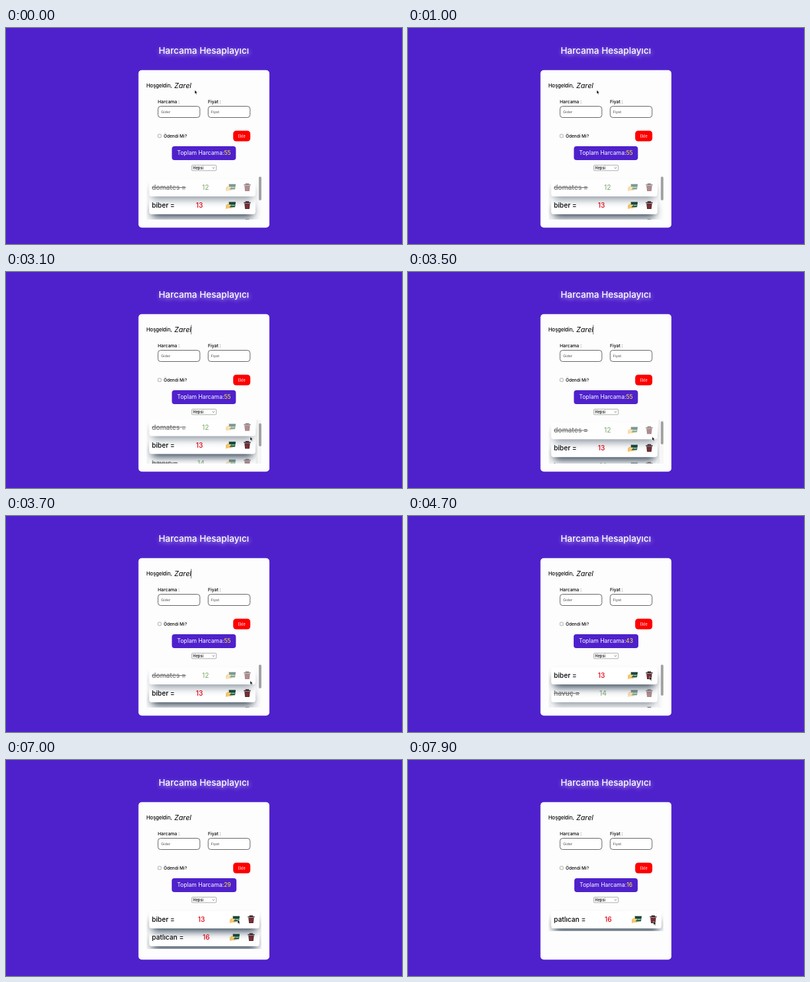
Write an HTML page that moves like this. It is 600 px wide and 327 px high and loops after 8000 ms.

```html
<!DOCTYPE html>
<html lang="tr">
<head>
<meta charset="utf-8">
<style>
  html, body { margin: 0; width: 100%; height: 100%; overflow: hidden; background: #4f21cc; }
  body { position: relative; font-family: Inter, "Open Sans", sans-serif; }
  svg { position: absolute; overflow: visible; }
  #stage { left: 0; top: 0; }
  #title { font-size: 13.6px; font-weight: 500; text-shadow: 1px 2px 6px #fff9; }
  #total {
    position: absolute; left: 300px; top: 179.4px; transform: translateX(-50%);
    padding: 0 8px; border-radius: 4px; background: #4f21cc; color: #fff;
    font-size: 8.6px; line-height: 20.2px; white-space: nowrap;
  }
  #sum { color: #ffee32; }
  #list { position: absolute; left: 213px; top: 224px; width: 174px; overflow: hidden; }
  #rows { position: absolute; inset: 0; }
  .row {
    position: absolute; left: 4px; height: 26px; border-radius: 4px; background: #fff;
    box-shadow: 0 8.3px 12.5px -4.2px rgb(38, 57, 77);
    font-size: 10.2px; font-weight: 500; line-height: 25px; white-space: nowrap;
  }
  .row span { position: absolute; top: 0; }
  .name { left: 4px; }
  .price { color: #e60012; }
  .paid { opacity: .55; }
  .paid .name { text-decoration: line-through; }
  .paid .price { color: #357a18; }
  .row svg { right: 6.7px; top: 6px; }
  #track, #thumb { position: absolute; }
  #track { right: 0; top: 0; width: 6px; height: 66px; background: #f6f6f6; border-left: .5px solid #e4e4e4; }
  #thumb { right: .5px; width: 3.6px; border-radius: 2px; background: #a3a3a3; }
</style>
</head>
<body>
<svg id="stage" width="600" height="327">
  <rect x="200.7" y="63.7" width="198.4" height="238.5" rx="5" fill="#fdfdfd"/>
  <text id="title" x="299.7" y="39.3" text-anchor="middle" fill="#fff">Harcama Hesaplayıcı</text>
  <g font-weight="500">
    <text x="212.7" y="90" font-size="7.6">Hoşgeldin,</text>
    <text x="230" y="113.7" font-size="6.8">Harcama :</text>
    <text x="306" y="113.7" font-size="6.8">Fiyat :</text>
    <text x="239" y="165.7" font-size="6.5">Ödendi Mi?</text>
  </g>
  <text x="255" y="90.7" font-size="10.7" font-style="italic">Zarel</text>
  <path id="caret" d="M280.6 80V94.5" stroke="#000" stroke-width=".5"/>
  <g fill="#fff" stroke="#555" stroke-width=".9">
    <rect x="230.3" y="118.5" width="63.5" height="17" rx="4"/>
    <rect x="306.3" y="118.5" width="63.5" height="17" rx="4"/>
  </g>
  <g fill="#666" font-size="5.4" font-weight="500">
    <text x="235" y="129">Gider</text>
    <text x="310.5" y="129">Fiyat</text>
  </g>
  <g fill="#fff" stroke="#767676" stroke-width=".6">
    <rect x="230.3" y="161" width="4.8" height="4.8" rx="1"/>
    <rect x="281.4" y="207.7" width="37.2" height="8.2" rx="1.2"/>
  </g>
  <text x="283.3" y="213.8" font-size="5.7" font-weight="500">Hepsi</text>
  <path d="M312.6 211l1.7 1.7 1.7-1.7" fill="none" stroke="#333" stroke-width=".6"/>
  <rect x="344.2" y="155.5" width="26" height="16" rx="4.5" fill="#f00"/>
  <text x="357.2" y="165.5" font-size="5.5" text-anchor="middle" fill="#fff">Ekle</text>
</svg>

<div id="total">Toplam Harcama:<span id="sum"></span></div>

<div id="list">
  <div id="rows"></div>
  <div id="track"></div>
  <div id="thumb"></div>
</div>

<svg width="0" height="0">
  <symbol id="icons" viewBox="0 0 38 13">
    <path d="M0 6.5L4 3.5 9 4 13 9 8 11H4L0 12Z" fill="#f5c56b"/>
    <path d="M4.5 1.2H15L14 9.2H6Z" fill="#235c4c"/>
    <path d="M5 3.2H14.8" stroke="#15352d" stroke-width="1.4"/>
    <path d="M8.5 6.4H13.5" stroke="#a9d6a5" stroke-width="1.3"/>
    <path d="M3 6.2L8 5.2 7.5 7.5 5 8.5Z" fill="#ffdc94"/>
    <path d="M27.3 2.6H37.7M30.5 2V.9H34.5V2" fill="none" stroke="#42272b" stroke-width="1.5"/>
    <path d="M28.3 3.8H36.7L35.8 12H29.2Z" fill="#4b2a2e"/>
    <path d="M30.4 4.8L30.8 11M32.5 4.8V11M34.6 4.8L34.2 11" stroke="#b52f38" stroke-width=".9"/>
  </symbol>
</svg>

<svg id="cursor" width="8" height="10" style="left:0;top:0">
  <path d="M0 0V5.6L1.3 4.5 2.2 6.5 3.2 6 2.3 4.1H4Z" fill="#000" stroke="#fff" stroke-width=".5"/>
</svg>

<script>
const LOOP = 8000, PITCH = 27, VIEW = 66;
const $ = id => document.getElementById(id);

const items = [
  { name: 'domates', price: 12, x: 80, paid: true, gone: 4700 },
  { name: 'biber', price: 13, x: 70.7, gone: 7650 },
  { name: 'havuç', price: 14, x: 73, paid: true, gone: 6000 },
  { name: 'patlıcan', price: 16, x: 78, gone: Infinity }
];

// Each stop is [time, ...values].
const cursorPath = [
  [0, 286, 94], [1400, 286, 94], [1900, 293, 114], [2050, 293, 114],
  [2400, 281, 88], [2600, 281, 88], [2950, 370, 249.5], [3800, 370, 249.5],
  [4300, 366, 243], [4900, 366, 243], [5300, 366, 248], [5550, 366, 248],
  [5850, 366, 269], [6250, 366, 269], [6850, 351, 242], [7150, 351, 242],
  [7500, 372, 244], [LOOP, 372, 244]
];
const scrollPath = [[0, 0], [2800, 0], [3100, 6.5], [3300, 6.5], [3600, 0], [LOOP, 0]];

function along(path, t) {
  const i = path.findIndex(stop => stop[0] > t);
  const [a, b] = [path[i - 1], path[i]];
  const u = (t - a[0]) / (b[0] - a[0]);
  const eased = u * u * (3 - 2 * u);
  return a.slice(1).map((v, k) => v + (b[k + 1] - v) * eased);
}

// Upper rows stack above lower ones, so each shadow falls on the row below.
items.forEach((item, i) => {
  const row = item.row = document.createElement('div');
  row.className = item.paid ? 'row paid' : 'row';
  row.style.zIndex = items.length - i;
  row.innerHTML = `<span class="name">${item.name} =</span><span class="price">${item.price}</span>
    <svg width="38" height="13"><use href="#icons"/></svg>`;
  $('rows').append(row);
});

function draw(now) {
  const t = now % LOOP;
  const live = items.filter(item => t < item.gone);
  const content = 8 + PITCH * live.length;
  const wide = content <= VIEW;
  const [scroll] = along(scrollPath, t);
  const [x, y] = along(cursorPath, t);

  for (const item of items) {
    const i = live.indexOf(item), row = item.row;
    row.style.display = i < 0 ? 'none' : '';
    row.style.top = 5 + i * PITCH + 'px';
    row.style.width = (wide ? 166.5 : 160.5) + 'px';
    row.querySelector('.price').style.left = item.x + (wide ? 3 : 0) + 'px';
  }
  $('list').style.height = Math.min(VIEW, content) + 'px';
  $('rows').style.transform = `translateY(${-scroll}px)`;
  $('sum').textContent = live.reduce((sum, item) => sum + item.price, 0);

  $('thumb').style.display = wide ? 'none' : '';
  $('thumb').style.top = 1 + scroll * VIEW / content + 'px';
  $('thumb').style.height = VIEW * VIEW / content - 2 + 'px';
  $('track').style.display = scroll > 0 ? '' : 'none';

  $('caret').style.display = t > 2500 && t < 4600 ? '' : 'none';
  $('cursor').style.transform = `translate(${x}px, ${y}px)`;
  requestAnimationFrame(draw);
}
requestAnimationFrame(draw);
</script>
</body>
</html>
```
